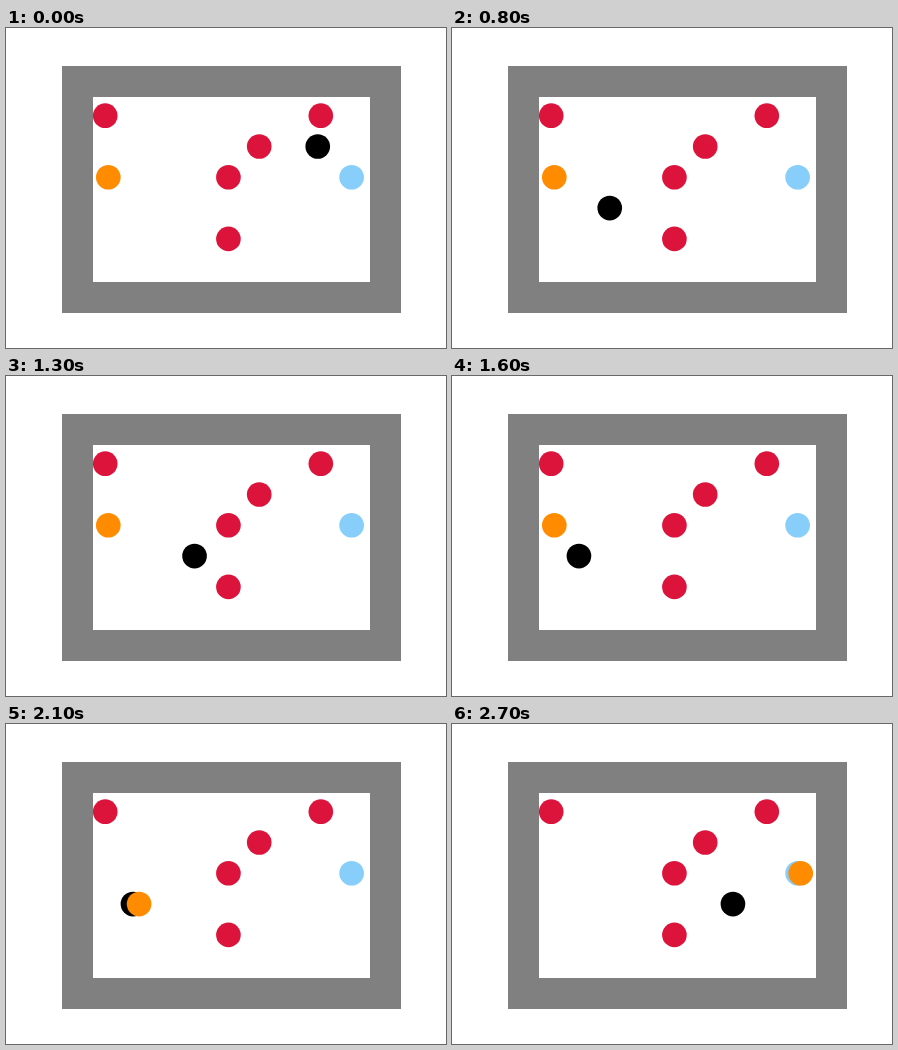
Recreate the animation shown at these times as an HTML page with a canvas. Size 440 px wide and 320 px high, loop 2.8 s.

```html
<!DOCTYPE html>
<html lang="en">
<head>
<meta charset="utf-8">
<title>Grid courier</title>
<style>
  html, body { margin: 0; width: 100%; height: 100%; overflow: hidden; background: #fff; }
  canvas { display: block; width: 440px; height: 320px; }
</style>
</head>
<body>
<canvas id="stage" width="440" height="320"></canvas>
<script>
const ctx = document.getElementById('stage').getContext('2d');

const CELL = 30.8;
const LEFT = 102.3;   // centre of column 0
const TOP = 87.68;    // centre of row 0
const TICK = 100;
const LOOP = 2800;

const rocks = [[0, 0], [7, 0], [5, 1], [4, 2], [4, 4]];
const goal = [8, 2];
const parcelStart = [0, 2];
const pickUp = 18, dropOff = 27;

// The courier's steps, one word per tick; "-" is a rest.
const moves = ('- D DL D - U LL L L L RR - L R LL L R L UU ' +
               'D D R RR R R - R -').split(' ');
const dirs = { U: [0, -1], D: [0, 1], L: [-1, 0], R: [1, 0], '-': [0, 0] };

const path = [];
let cell = [7, 1];
for (const word of moves) {
  for (const step of word) {
    cell = [cell[0] + dirs[step][0], cell[1] + dirs[step][1]];
  }
  path.push(cell);
}

function disc([col, row], color, shift) {
  ctx.fillStyle = color;
  ctx.beginPath();
  ctx.arc(LEFT + (col + shift) * CELL, TOP + row * CELL, 0.4 * CELL, 0, 2 * Math.PI);
  ctx.fill();
}

function rect(color, x, y, w, h) {
  ctx.fillStyle = color;
  ctx.fillRect(x, y, w, h);
}

function draw(tick) {
  rect('#fff', 0, 0, 440, 320);
  rect('#808080', 56, 38, 339, 247);
  rect('#fff', 87, 69, 277, 185);

  const courier = path[tick];
  const parcel = tick < pickUp ? parcelStart : tick < dropOff ? courier : goal;

  for (const rock of rocks) disc(rock, '#dc143c', -0.1);
  disc(goal, '#87cefa', -0.1);
  disc(courier, '#000', -0.2);
  disc(parcel, '#ff8c00', 0);
}

const start = performance.now();
function frame() {
  const time = (performance.now() - start) % LOOP;
  draw(Math.floor(time / TICK));
  requestAnimationFrame(frame);
}
frame();
</script>
</body>
</html>
```
